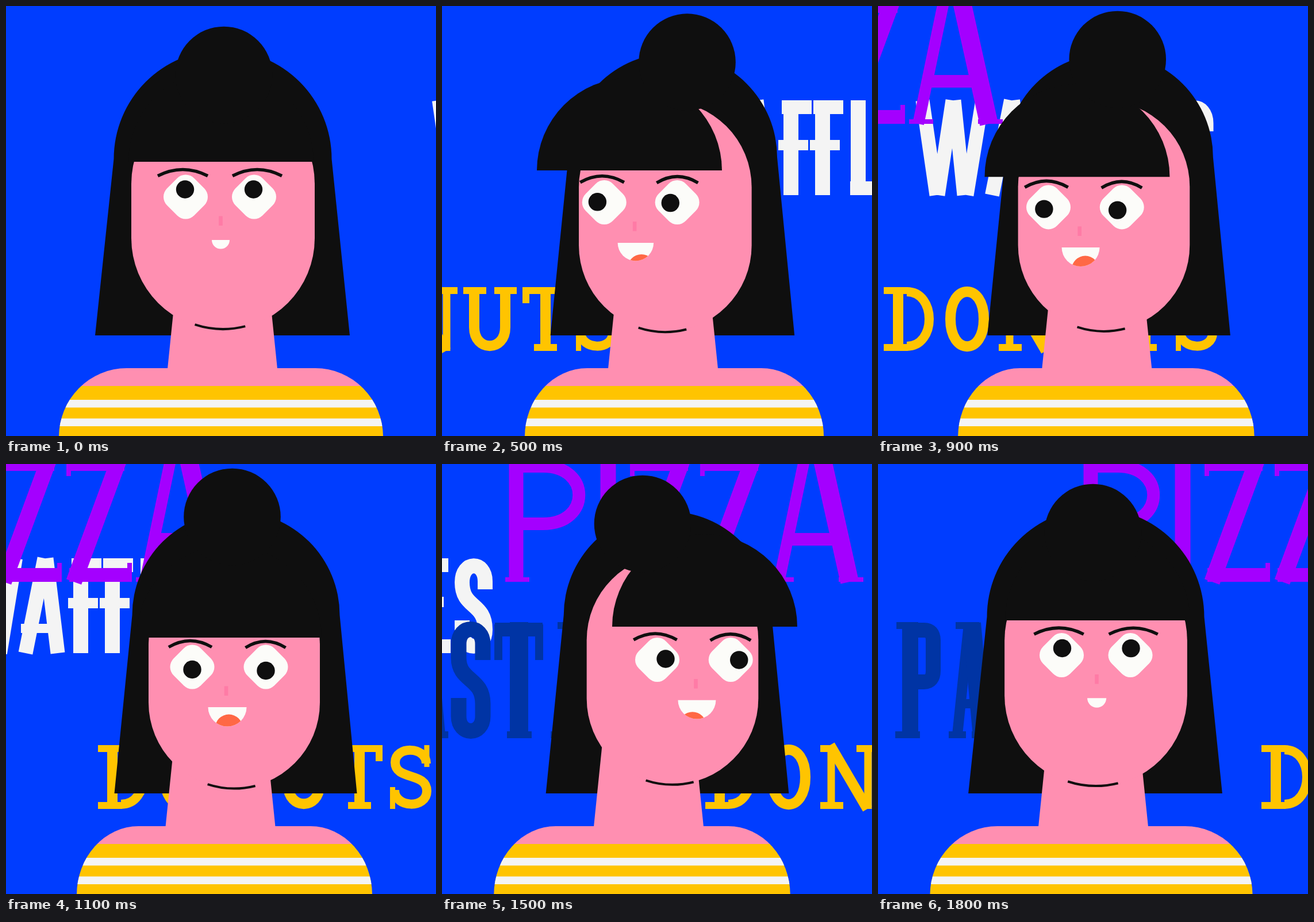
Animation of 748 by 748 pixels, one loop 1900 ms. Source, as an HTML page with a canvas:

```html
<!DOCTYPE html>
<html lang="en">
<head>
<meta charset="utf-8">
<title>Choices</title>
<style>
html, body { margin: 0; width: 100%; height: 100%; overflow: hidden; background: #003dff; }
canvas { display: block; width: 748px; height: 748px; }
</style>
</head>
<body>
<canvas id="stage" width="748" height="748" role="img" aria-label="Woman looking around at the words PIZZA, WAFFLES, PASTA, DONUTS"></canvas>
<script>
const ctx = document.getElementById('stage').getContext('2d');
const LOOP = 1900, STEP = 100;
const TIMES = [0, 300, 700, 1100, 1300, 1500, 1800];
const BLUE = '#003dff', BLACK = '#0f0f0f', PINK = '#ff8fb1', NOSE = '#ff7ba6', WHITE = '#fcfcf9',
  STRIPE = '#f4f4f4', YELLOW = '#ffc400', PURPLE = '#a400ff', NAVY = '#0034a4', TONGUE = '#ff6845';

// Pose of the figure at TIMES; squeeze narrows everything while she turns.
const POSE = {
  squeeze: [0, .78, .93, 1, 1.02, .97, .06],
  torso:   [374, 401.5, 405, 380, 350.5, 348, 371],
  neck:    [376.5, 384.5, 384.5, 373, 359.5, 359.5, 374.5],
  hair:    [376.5, 397, 402.5, 399.5, 394.5, 392, 378],
  bunX:    [379, 422.5, 428, 393.5, 354.5, 349, 374],
  bunY:    [120, 102, 95, 92, 98, 104, 119],
  face:    [377.5, 386.5, 390, 397, 403.5, 401, 379],
  jawY:    [404, 416.5, 416.5, 415, 410, 408, 402.5],
  fringeX: [374, 326, 326, 388, 454, 457, 382],
  fringeY: [271, 282, 290, 302, 290, 283, 272],
  eyeX:    [312.5, 282, 283, 324, 373, 374.5, 319.5],
  eyeY:    [332, 338, 345, 353, 344, 340.5, 332.5],
  lookX:   [-1, -12, -11.5, 0, 13, 14.5, 1],
  lookY:   [-13, -3, 1, 4.5, 2.5, -1.5, -12],
  nose:    [373.5, 335.5, 335, 383, 439, 441.5, 380.5]
};

// Lettering: each glyph is a list of [line width, path].
const pizzaZ = [[28, 'M93-6L15 205'], [18, 'M5 3H103'], [24, 'M7 193H113'], [8, 'M6 0V21M112 172V205']];
const waffleF = [[26, 'M22 0V165'], [24, 'M6 12H58'], [18, 'M0 78H52']];
const pastaA = [[18, 'M35 4L15 196'], [32, 'M40 2L58 198'], [16, 'M20 142H56'], [12, 'M12 6H53M0 196H30M40 196H79']];
const WORDS = [
  { color: YELLOW, y: 489, x: [-610, -410, -140, 160, 310, 458, 667], glyphs: [
    [0, [[18, 'M25 0V111'], [16, 'M40 8C92 8 92 103 40 103'], [12, 'M0 6H42M0 105H42']]],
    [107, [[18, 'M9 55.5C9-8 67-8 67 55.5C67 119 9 119 9 55.5Z']]],
    [200, [[13, 'M19 0V111M83 0V111'], [18, 'M17 0L82 111'], [12, 'M0 6H22M0 105H40M63 6H102']]],
    [312, [[18, 'M19 0V70C19 113 73 113 73 70V0'], [12, 'M0 6H40M54 6H93']]],
    [415, [[18, 'M40 0V111'], [12, 'M0 6H80M6 0V28M74 0V28M20 105H60']]],
    [508, [[16, 'M63 32C63 2 9 1 9 30C9 62 64 46 64 80C64 111 8 110 8 78'], [9, 'M64 0V38M4.5 73V111']]]
  ] },
  { color: STRIPE, y: 164, x: [860, 645, 349, 20, -144, -311, -556], glyphs: [
    [-112, [[24, 'M5 0L29 165M57 0L32 165M60 0L77 165M109 0L82 165']]],
    [0, [[25, 'M47 0L14 165M50 0L70 165'], [16, 'M6 122H70']]],
    [88, waffleF],
    [143, waffleF],
    [205, [[26, 'M22 0V165'], [24, 'M8 153H57']]],
    [266, [[26, 'M20 0V165'], [24, 'M6 12H56M6 153H60'], [18, 'M0 76H48']]],
    [332, [[26, 'M54 54V40C54 4 14 4 14 42C14 88 54 76 54 124C54 162 14 162 14 126V108']]]
  ] },
  { color: NAVY, y: 275, x: [-1180, -985, -715, -445, -300, -161, 30], glyphs: [
    [0, [[28, 'M26 0V202'], [26, 'M20 14H50Q66 14 66 32V84Q66 104 50 104H20'], [12, 'M2 6H40M0 196H43']]],
    [93, pastaA],
    [176, [[27, 'M56 66V38C56 4 14 4 14 38V62C14 104 56 96 56 142V164C56 198 14 198 14 164V132']]],
    [250, [[32, 'M45 0V202'], [24, 'M3 13H86'], [14, 'M9 4V66M80 4V66'], [12, 'M24 196H67']]],
    [350, pastaA]
  ] },
  { color: PURPLE, y: 0, x: [-1180, -922, -578, -234, -62, 110, 351], glyphs: [
    [0, [[25, 'M19-6V205'], [22, 'M18 4H66C149 4 149 104 66 104H18'], [8, 'M0 201H42']]],
    [157, [[27, 'M22-6V205'], [8, 'M0 201H45']]],
    [215, pizzaZ],
    [337, pizzaZ],
    [460, [[20, 'M60-6L16 205'], [32, 'M92-6L139 205'], [22, 'M30 131H122'], [8, 'M0 201H42M120 201H163']]]
  ] }
].map(word => ({ ...word, glyphs: word.glyphs.map(([x, lines]) =>
  [x, lines.map(([width, d]) => [width, new Path2D(d)])]) }));

const linear = (keys, t) => {
  let i = 0;
  while (i < TIMES.length - 2 && t >= TIMES[i + 1]) i++;
  const u = (t - TIMES[i]) / (TIMES[i + 1] - TIMES[i]);
  return keys[i] + (keys[i + 1] - keys[i]) * u;
};

// Looping curve through the keys without overshoot.
function smooth(keys, t) {
  const n = keys.length;
  const time = i => TIMES[(i + n) % n] + Math.floor(i / n) * LOOP;
  const value = i => keys[(i + n) % n];
  const rate = i => (value(i + 1) - value(i)) / (time(i + 1) - time(i));
  const tangent = i => {
    const a = rate(i - 1), b = rate(i);
    return a * b > 0 ? 2 * a * b / (a + b) : 0;
  };
  let i = n - 1;
  while (t < TIMES[i]) i--;
  const span = time(i + 1) - time(i), u = (t - time(i)) / span, v = 1 - u;
  return value(i) * (1 + 2 * u) * v * v + value(i + 1) * u * u * (3 - 2 * u)
    + span * u * v * (tangent(i) * v - tangent(i + 1) * u);
}

function fill(color, trace) {
  ctx.beginPath();
  trace();
  ctx.fillStyle = color;
  ctx.fill();
}
const disc = (color, x, y, r) => fill(color, () => ctx.arc(x, y, r, 0, 2 * Math.PI));

function drawWord({ color, x, y, glyphs }, t) {
  ctx.strokeStyle = color;
  for (const [dx, lines] of glyphs) {
    ctx.save();
    ctx.translate(linear(x, t) + dx, y);
    for (const [width, path] of lines) {
      ctx.lineWidth = width;
      ctx.stroke(path);
    }
    ctx.restore();
  }
}

function drawBody(p, k) {
  const half = 282 - 25 * k, rx = half * .418;
  ctx.save();
  ctx.beginPath();
  ctx.ellipse(p.torso - half + rx, 750, rx, 120, 0, Math.PI, 1.5 * Math.PI);
  ctx.ellipse(p.torso + half - rx, 750, rx, 120, 0, 1.5 * Math.PI, 2 * Math.PI);
  ctx.clip();
  const band = (color, y, h) => {
    ctx.fillStyle = color;
    ctx.fillRect(0, y, 748, h);
  };
  band(PINK, 630, 32);
  band(YELLOW, 661, 87);
  band(STRIPE, 685, 13.5);
  band(STRIPE, 717.5, 13.5);
  ctx.restore();
  fill(PINK, () => {
    ctx.moveTo(p.neck - 80, 480);
    ctx.lineTo(p.neck + 80, 480);
    ctx.lineTo(p.neck + 95.5, 631);
    ctx.lineTo(p.neck - 95.5, 631);
  });
}

function drawBackHair(p, k) {
  const half = 221.5 - 10.5 * k, r = 189.5 - 9 * k;
  fill(BLACK, () => {
    ctx.moveTo(p.hair - half, 573);
    ctx.arc(p.hair + .5, 266 - 3 * k, r, Math.PI, 2 * Math.PI);
    ctx.lineTo(p.hair + half, 573);
  });
}

function drawEye(x, y, p, pupilDrop) {
  const d = 47.2;
  fill(WHITE, () => {
    ctx.moveTo(x - d / 2, y - d / 2);
    ctx.arcTo(x, y - d, x + d, y, 21);
    ctx.arcTo(x + d, y, x, y + d, 21);
    ctx.arcTo(x, y + d, x - d, y, 21);
    ctx.arcTo(x - d, y, x, y - d, 21);
  });
  disc(BLACK, x + p.lookX, y + p.lookY + pupilDrop, 15.7);
}

function drawBrow(x, y, width) {
  ctx.beginPath();
  ctx.moveTo(x - width / 2, y);
  ctx.quadraticCurveTo(x, y - 22, x + width / 2, y);
  ctx.lineWidth = 5.5;
  ctx.stroke();
}

function drawMouth(p, k) {
  const x = p.nose + 2 * k, y = p.eyeY + 75 - 5 * k;
  ctx.save();
  fill(WHITE, () => ctx.arc(x, y, 15.5 + 18 * k, 0, Math.PI));
  ctx.clip();
  disc(TONGUE, x - (p.nose - p.face) * .19, y + 50 - (p.eyeY - 332) * .64, 24);
  ctx.restore();
}

function drawFace(p, k) {
  const r = 159.5 - 10.5 * k;
  fill(PINK, () => {
    ctx.arc(p.face, p.jawY - 95 - 7 * k, r, Math.PI, 2 * Math.PI);
    ctx.arc(p.face, p.jawY, r, 0, Math.PI);
  });
  ctx.strokeStyle = BLACK;
  ctx.lineWidth = 4;
  ctx.beginPath();
  ctx.arc(p.face, p.jawY, r - 1.5 + 2 * k, Math.acos(.245), Math.acos(-.31));
  ctx.stroke();

  const rightX = p.eyeX + 119 + 9 * k, browY = p.eyeY - 36.5 + 2 * k;
  drawEye(p.eyeX, p.eyeY, p, 0);
  drawEye(rightX, p.eyeY, p, 2 * k);
  drawBrow(p.eyeX - 5 + 1.5 * k, browY, 87 - 12 * k);
  drawBrow(rightX + 5.5 - 6 * k, browY + k, 86 - 16 * k);
  ctx.fillStyle = NOSE;
  ctx.fillRect(p.nose - 3.3, p.eyeY + 33.5, 6.6, 16.5);
  drawMouth(p, k);
}

function draw(t) {
  const p = {};
  for (const name in POSE) p[name] = smooth(POSE[name], t);
  const k = p.squeeze;
  ctx.fillStyle = BLUE;
  ctx.fillRect(0, 0, 748, 748);
  for (const word of WORDS) drawWord(word, t);
  drawBackHair(p, k);
  drawBody(p, k);
  drawFace(p, k);
  fill(BLACK, () => ctx.arc(p.fringeX, p.fringeY, 161, Math.PI, 2 * Math.PI));
  disc(BLACK, p.bunX, p.bunY, 84.3);
}

const start = performance.now();
function tick() {
  const t = (performance.now() - start) % LOOP;
  draw(Math.floor(t / STEP) * STEP);
  requestAnimationFrame(tick);
}
tick();
</script>
</body>
</html>
```
